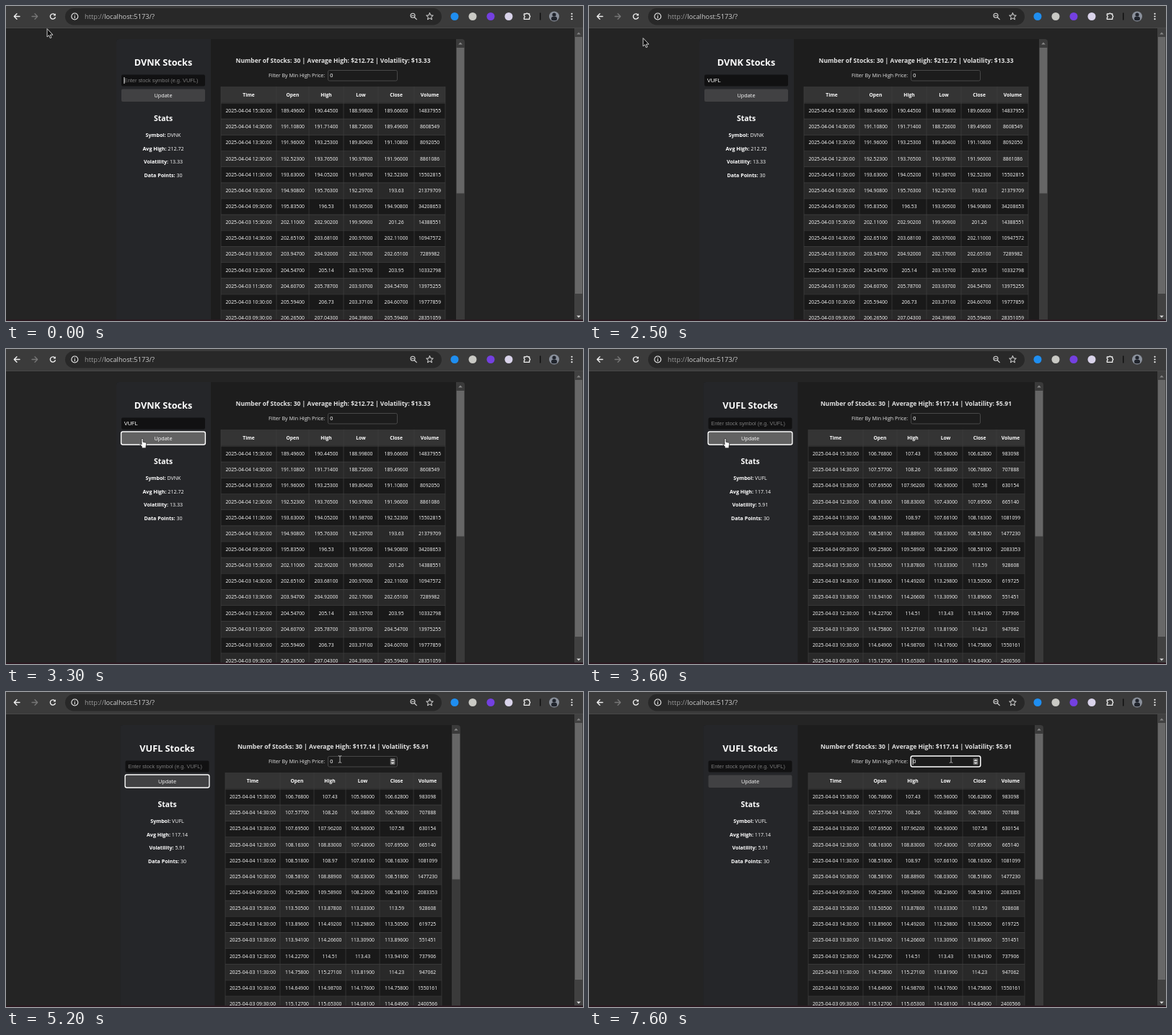
These frames come from a looping animation (800 by 438 pixels, 8 s). An HTML page with a canvas:

```html
<!DOCTYPE html>
<html lang="en">
<head>
<meta charset="utf-8">
<title>Stock dashboard</title>
<style>
  html, body { margin: 0; width: 100%; height: 100%; overflow: hidden; background: #242424; }
  canvas { display: block; width: 800px; height: 438px; }
</style>
</head>
<body>
<canvas id="stage" width="800" height="438"></canvas>
<script>
const ctx = document.getElementById('stage').getContext('2d');
const LOOP = 8000, STEP = 100;
const UI = '"Open Sans", "Noto Sans", sans-serif';
const FIELD = '"Liberation Sans", Arial, sans-serif';

function seeded(seed) {
  return () => {
    seed = (seed * 16807) % 2147483647;
    return seed / 2147483647;
  };
}

// Hourly quotes, newest first; days lists [latest, earliest] opening prices.
function quotes({ days, spread, volume, seed }) {
  const random = seeded(seed);
  const price = v => random() < 0.12 ? v.toFixed(2) : v.toFixed(3) + '00';
  const rows = [];
  let later = 0;
  days.forEach(([latest, earliest], day) => {
    for (let i = 0; i < 7; i++) {
      const hour = 15 - i;
      const open = latest + (earliest - latest) * i / 6 + (random() - 0.5) * spread * 0.6;
      const close = i ? later : open + (random() - 0.6) * spread;
      const high = Math.max(open, close) + (0.2 + random() * 0.6) * spread;
      const low = Math.min(open, close) - (0.2 + random() * 0.6) * spread;
      const traded = volume * (1 + 0.19 * (hour - 13) ** 2) * (0.85 + random() * 0.3);
      rows.push([
        `2025-04-0${4 - day} ${String(hour).padStart(2, '0')}:30:00`,
        ...[open, high, low, close].map(price),
        String(Math.round(traded))
      ]);
      later = open;
    }
  });
  return rows;
}

const before = {
  symbol: 'DVNK', high: '212.72', vol: '13.33',
  left: 153, right: 636,
  cols: [298, 375, 420, 468, 516, 566, 609],
  rows: quotes({ days: [[190, 196], [202.2, 206]], spread: 1.8, volume: 8e6, seed: 4217 })
};
const after = {
  symbol: 'VUFL', high: '117.14', vol: '5.91',
  left: 158.5, right: 630,
  cols: [304, 380, 427, 471, 518, 565, 604],
  rows: quotes({ days: [[107, 109], [113.6, 115]], spread: 0.9, volume: 5.5e5, seed: 9035 })
};

function rect(x, y, w, h, fill, radius = 0) {
  ctx.fillStyle = fill;
  ctx.beginPath();
  ctx.roundRect(x, y, w, h, radius);
  ctx.fill();
}

function frame(x, y, w, h, color, width, radius) {
  ctx.strokeStyle = color;
  ctx.lineWidth = width;
  ctx.beginPath();
  ctx.roundRect(x, y, w, h, radius);
  ctx.stroke();
}

function disc(x, y, r, fill) {
  ctx.fillStyle = fill;
  ctx.beginPath();
  ctx.arc(x, y, r, 0, 7);
  ctx.fill();
}

function setFont(size, { bold = false, family = UI } = {}) {
  ctx.font = `${bold ? 'bold ' : ''}${size}px ${family}`;
}

// Draws text whose capitals are centred on y; returns its width.
function text(str, x, y, size, color, style = {}) {
  setFont(size, style);
  ctx.textAlign = style.align || 'left';
  ctx.fillStyle = color;
  ctx.fillText(str, x, y + size * 0.36);
  return ctx.measureText(str).width;
}

function shape(d, x, y, { fill, stroke, width = 1, flip = 1 }) {
  const path = new Path2D(d);
  ctx.save();
  ctx.translate(x, y);
  ctx.scale(flip, 1);
  ctx.lineWidth = width;
  ctx.lineJoin = ctx.lineCap = 'round';
  if (fill) { ctx.fillStyle = fill; ctx.fill(path); }
  if (stroke) { ctx.strokeStyle = stroke; ctx.stroke(path); }
  ctx.restore();
}

function toolbar() {
  rect(0, 0, 800, 31, '#3b3b3b');
  rect(0, 30, 800, 1, '#484848');
  rect(82, 3, 522, 23.5, '#282828', 12);
  const back = 'M4 0H-3.5M0-3.7L-3.7 0L0 3.7';
  shape(back, 15, 14.5, { stroke: '#f0f0f0', width: 1.4 });
  shape(back, 40, 14.5, { stroke: '#777', width: 1.3, flip: -1 });
  shape('M3.3 1.4A3.6 3.6 0 1 1 2.7-2.4', 65, 14.5, { stroke: '#f0f0f0', width: 1.4 });
  shape('M3.8-4.2V-.9H.5Z', 65, 14.5, { fill: '#f0f0f0' });
  shape('M4.5 0A4.5 4.5 0 1 1-4.5 0A4.5 4.5 0 1 1 4.5 0M0-.4V2.3M0-2.3V-2.2', 95.3, 14.5, { stroke: '#eee', width: 1.1 });

  const schemeWidth = text('http://', 109, 14.5, 9.25, '#999');
  text('localhost:5173/?', 109 + schemeWidth, 14.5, 9.25, '#cecece');

  shape('M2-1A3 3 0 1 1-4-1A3 3 0 1 1 2-1M1.2 1.2L4.3 4.3M-2.3-1H.3', 565, 14.3, { stroke: '#d8d8d8', width: 1.1 });
  shape('M0-4.8L1.4-1.6L4.8-1.3L2.2 .9L3 4.3L0 2.5L-3 4.3L-2.2 .9L-4.8-1.3L-1.4-1.6Z', 587.5, 14.5, { stroke: '#e4e4e4' });

  ['#1f8ef0', '#c9c9c4', '#7440e0', '#d9d3ea'].forEach((color, i) => disc(622 + i * 25, 14.5, 5.5, color));
  shape('M-4-2.8H-1.4A1.5 1.5 0 0 1 1.4-2.8H3.4V-.6A1.5 1.5 0 0 1 3.4 2.2V4.6H-4V2.3A1.5 1.5 0 0 0-4-.5Z', 722.3, 13.8, { stroke: '#f0f0f0', width: 1.3 });
  rect(740, 9.5, 1.5, 10, '#111');

  disc(760, 14.5, 7, '#8b919c');
  disc(760, 12, 2.6, '#20242c');
  rect(756, 14.7, 8, 5.5, '#20242c', 2.5);
  for (const dy of [-3.7, 0, 3.7]) disc(784.5, 14.5 + dy, 1.1, '#f4f4f4');
}

function arrowHead(x, y, dir, color) {
  shape(`M-2.8 ${1.5 * dir}H2.8L0 ${-1.5 * dir}Z`, x, y, { fill: color });
}

function pageScrollbar() {
  rect(788, 31, 12, 407, '#414141');
  rect(789, 43, 10, 357, '#686868');
  arrowHead(794, 38, 1, '#858585');
  arrowHead(794, 432, -1, '#dedede');
}

function sidebar(data, s) {
  const x = data.left + 7, mid = data.left + 65;
  rect(data.left, 46, 131, 392, '#252629', [4, 0, 0, 0]);
  const title = { align: 'center', bold: true };
  text(`${data.symbol} Stocks`, mid, 78, 12.7, '#fff', title);

  rect(x, 95.5, 116, 16, '#111112', 2);
  const typing = { family: FIELD };
  if (s.typed) text(s.typed, x + 3.7, 103.5, 7.4, '#fff', typing);
  else text('Enter stock symbol (e.g. VUFL)', x + 3.7, 103.5, 7.4, '#7a7a7a', typing);
  if (s.symbolCaret) {
    setFont(7.4, typing);
    rect(x + 3.5 + ctx.measureText(s.typed).width, 99, 0.9, 9, '#fff');
  }

  rect(x, 115.5, 116, 17.5, s.hover ? '#626262' : '#414143', 2);
  if (s.buttonFocus) frame(x - 0.4, 115, 116.8, 18, '#fff', 1.4, 2.5);
  text('Update', mid, 124.5, 7.3, '#fff', { align: 'center' });

  text('Stats', mid, 156.3, 10.4, '#fff', title);
  const stats = [['Symbol: ', data.symbol], ['Avg High: ', data.high], ['Volatility: ', data.vol], ['Data Points: ', '30']];
  stats.forEach(([name, value], i) => {
    const size = 7.1, y = 179.5 + i * 18.5;
    setFont(size, { bold: true });
    const nameWidth = ctx.measureText(name).width;
    setFont(size);
    const start = mid - (nameWidth + ctx.measureText(value).width) / 2;
    text(name, start, y, size, '#fff', { bold: true });
    text(value, start + nameWidth, y, size, '#fff');
  });
}

function filter(s) {
  text('Filter By Min High Price:', 364, 96.8, 7.1, '#e4e4e4');
  rect(446, 89, 97, 15.5, '#1c1c1c', 2);
  if (s.inputFocus) frame(446.2, 89.1, 96.6, 15, '#fff', 1.5, 2.5);
  else frame(446.5, 89.5, 96, 14.5, '#484848', 1, 2);
  text('0', 449.2, 96.8, 7.4, '#fff', { family: FIELD });
  if (s.caretX) rect(s.caretX, 92.3, 0.9, 9, '#fff');
  if (s.spinner) {
    rect(532.7, 92.3, 6.8, 9, '#6b6b6b', 1);
    arrowHead(536.1, 94.8, 0.6, '#fff');
    arrowHead(536.1, 98.9, -0.6, '#fff');
  }
}

function table({ cols, rows }) {
  const first = cols[0], width = cols[6] - first, pitch = 22.15, top = 134.7;
  const cells = (values, y, size, bold) => values.forEach((value, c) =>
    text(value, (cols[c] + cols[c + 1]) / 2, y, size, '#fff', { align: 'center', bold }));

  rect(first, 112, width, top - 112, '#343434');
  cells(['Time', 'Open', 'High', 'Low', 'Close', 'Volume'], 123.7, 6.7, true);
  rows.forEach((row, i) => {
    const y = top + i * pitch;
    rect(first, y, width, pitch, i % 2 ? '#292929' : '#191919');
    rect(first, y, width, 0.7, '#3f3f3f');
    cells(row, y + 11, 6.8);
  });
  for (const x of cols) rect(x - 0.35, 112, 0.7, 326, '#3f3f3f');
}

function panel(data, s) {
  rect(data.left, 46, data.right - data.left, 392, '#1d1d1d', 4);
  sidebar(data, s);
  text(`Number of Stocks: 30 | Average High: $${data.high} | Volatility: $${data.vol}`,
    453.5, 75.8, 8.5, '#e2e2e2', { align: 'center', bold: true });
  filter(s);
  table(data);
  const bar = data.right - 12;
  rect(bar, 46, 12, 392, '#3a3a3a', [0, 4, 0, 0]);
  rect(bar + 0.7, 58, 10.6, 202.5, '#666');
  arrowHead(bar + 6, 52, 1, '#888');
}

// Each move: first step, last step, end point, optional bend point.
const moves = [
  [2500, 2500, [75, 45]],
  [2700, 3200, [189, 124.3]],
  [4000, 4000, [241, 123]],
  [4300, 4800, [461, 97], [350, 325]],
  [5000, 5200, [463, 93.5]],
  [5900, 5900, [474, 93.5]],
  [6400, 6600, [502, 93.5]]
];

function pointer(t) {
  let pos = [57, 32];
  for (const [start, end, to, bend] of moves) {
    if (t < start) break;
    const p = Math.min(1, (t - start + STEP) / (end - start + STEP));
    const from = pos;
    pos = to.map((v, k) => {
      const mid = bend ? bend[k] : (from[k] + v) / 2;
      return (1 - p) ** 2 * from[k] + 2 * p * (1 - p) * mid + p * p * v;
    });
  }
  return pos;
}

const inside = ([x, y], left, top, w, h) => x >= left && x <= left + w && y >= top && y <= top + h;

function drawPointer([x, y], s) {
  if (s.hover) {
    shape('M-1.1 8V1.2A1.1 1.1 0 0 1 1.1 1.2V5L4.6 5.8Q6 6.2 5.8 7.7L5 11.2V13.5H-.6V11.5L-3.2 8.5Q-3.2 6.8-1.1 8Z',
      x, y, { fill: '#fff', stroke: '#222', width: 0.8 });
  } else if (s.spinner) {
    shape('M-1.8-4.8Q0-4.8 0-4Q0-4.8 1.8-4.8M0-4V4M-1.8 4.8Q0 4.8 0 4Q0 4.8 1.8 4.8', x, y, { stroke: '#c4c4c4', width: 0.9 });
  } else {
    shape('M0 0V11L2.5 8.7L4.2 12.7L6 11.9L4.3 8.1H7.6Z', x, y, { fill: '#0c0c0c', stroke: '#e0e0e0', width: 0.9 });
  }
}

function draw(t) {
  const data = t < 3600 ? before : after;
  const pos = pointer(t);
  const letters = t >= 3600 ? 0 : [700, 800, 1500, 1600].filter(k => t >= k).length;
  const state = {
    typed: 'VUFL'.slice(0, letters),
    symbolCaret: t < 100 || (t >= 500 && t < 1900),
    hover: inside(pos, data.left + 7, 115, 116, 18),
    buttonFocus: t >= 3300 && t < 5600,
    inputFocus: t >= 5600,
    spinner: inside(pos, 446, 89, 97, 16),
    caretX: t >= 7600 ? 448.6 : t >= 6400 && t < 6900 ? 453.3 : 0
  };
  rect(0, 0, 800, 438, '#242424');
  toolbar();
  panel(data, state);
  pageScrollbar();
  rect(0, 436, 800, 2, '#2b1820');
  drawPointer(pos, state);
}

function tick(now) {
  const t = now % LOOP;
  draw(t - t % STEP);
  requestAnimationFrame(tick);
}
requestAnimationFrame(tick);
</script>
</body>
</html>
```
